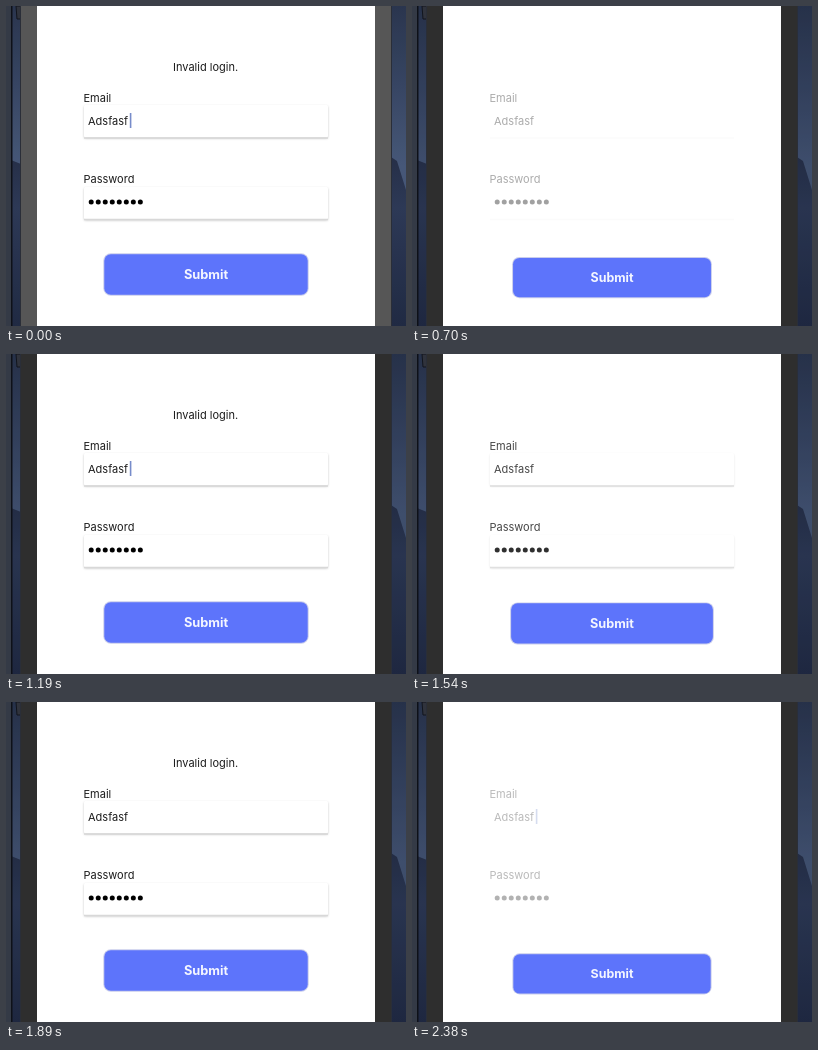
Write an HTML page that moves like this. It is 400 px wide and 320 px high and loops after 2450 ms.

```html
<!DOCTYPE html>
<html lang="en">
<head>
<meta charset="utf-8">
<title>Login form</title>
<style>
html, body { margin: 0; width: 100%; height: 100%; overflow: hidden; background: #fff; }
svg { display: block; width: 400px; height: 320px; }
text { font: 400 11px Inter, sans-serif; fill: #1c1c1c; }
#button text { font-size: 12.8px; font-weight: 700; fill: #f4f6ff; text-anchor: middle; }
.soft { filter: drop-shadow(0 1px 1.2px rgba(0, 0, 0, .22)); }
</style>
</head>
<body>
<svg viewBox="0 0 400 320">
  <defs>
    <linearGradient id="sky" x2="0" y2="1">
      <stop offset="0" stop-color="#2c3750"/>
      <stop offset=".25" stop-color="#3a4866"/>
      <stop offset=".5" stop-color="#4a5b7c"/>
      <stop offset=".6" stop-color="#4a5a7a"/>
      <stop offset="1" stop-color="#2c3855"/>
    </linearGradient>
    <linearGradient id="hill" x2="0" y2="1">
      <stop offset="0" stop-color="#28314a"/>
      <stop offset=".3" stop-color="#2f3b58"/>
      <stop offset="1" stop-color="#222b45"/>
    </linearGradient>
  </defs>

  <rect width="400" height="320" fill="url(#sky)"/>
  <path d="M0 152L15 158V320H0zM385 151L391 155 400 184V320H385z" fill="url(#hill)"/>
  <rect id="shade" width="400" height="320" fill="#101a30"/>
  <rect width="5" height="320" fill="#343a46"/>
  <rect x="5" width="1.5" height="320" fill="#0e1118"/>
  <path d="M10 0H16V13H11z" fill="#30333c" stroke="#12151d"/>
  <g id="bezel">
    <rect x="15" width="16" height="320"/>
    <rect x="369" width="16" height="320"/>
  </g>
  <path d="M14.5 0V320M385.5 0V320" stroke="#2a2e38"/>
  <rect x="31" width="338" height="320" fill="#fff"/>

  <text id="error" x="167" y="65">Invalid login.</text>
  <g id="boxes">
    <rect class="soft" x="78" y="99" width="244" height="32.5" rx="1.5" fill="#fff"/>
    <rect class="soft" x="78" y="181" width="244" height="32.5" rx="1.5" fill="#fff"/>
  </g>
  <path id="lines" d="M78 132H322M78 213.5H322" stroke="#d8d8d8" stroke-width="1.5"/>
  <g id="form">
    <text x="77.5" y="95.5">Email</text>
    <text x="82" y="118.5">Adsfasf</text>
    <text x="77.5" y="177">Password</text>
    <g id="dots"></g>
    <rect id="caret" x="123.8" y="107" width="1.6" height="15" fill="#4a66b8"/>
  </g>
  <g id="button">
    <rect x="97.3" y="247.3" width="205.4" height="42.4" rx="7.5" fill="#c9cdec"/>
    <rect x="98.3" y="248.3" width="203.4" height="40.4" rx="6.5" fill="#5d74fb"/>
    <text x="200" y="273">Submit</text>
  </g>
</svg>
<script>
const LOOP = 2450, FOCUS = 600;
const PRESSES = [580, 1490, 2220];
const CARET_OFF = [[420, 740], [1520, 1900]];
const $ = id => document.getElementById(id);
const clamp = x => Math.max(0, Math.min(1, x));
const ease = x => x * x * (3 - 2 * x);
const ramp = (t, a, b) => ease(clamp((t - a) / (b - a)));

for (let i = 0; i < 8; i++) {
  const dot = document.createElementNS('http://www.w3.org/2000/svg', 'circle');
  dot.setAttribute('cx', 85.2 + i * 7.02);
  dot.setAttribute('cy', 196);
  dot.setAttribute('r', 2.5);
  $('dots').append(dot);
}

// 0 = idle, 1 = fully pressed and waiting
const pressed = t => PRESSES.reduce((sum, s) =>
  sum + ramp(t, s, s + 150) - ramp(t, s + 170, s + 350), 0);

function draw(t) {
  const p = pressed(t);
  const waiting = PRESSES.some(s => t >= s && t < s + 240);
  const hidden = CARET_OFF.some(([a, b]) => t >= a && t < b);

  $('bezel').setAttribute('fill', t < FOCUS ? '#565656' : '#2e2e2e');
  $('shade').setAttribute('opacity', 0.05 + 0.15 * clamp(t / 560));
  $('error').setAttribute('opacity', waiting ? 0 : 1);
  $('form').setAttribute('opacity', 1 - 0.7 * p);
  $('caret').setAttribute('opacity', hidden ? 0 : 0.75);
  $('boxes').setAttribute('opacity', clamp(1 - 2 * p));
  $('lines').setAttribute('opacity', 1 - p);
  $('button').setAttribute('transform',
    `translate(200 ${268.5 + 3.4 * p}) scale(${1 - 0.03 * p}) translate(-200 -268.5)`);
}

const start = performance.now();
function tick() {
  draw((performance.now() - start) % LOOP);
  requestAnimationFrame(tick);
}
tick();
</script>
</body>
</html>
```
